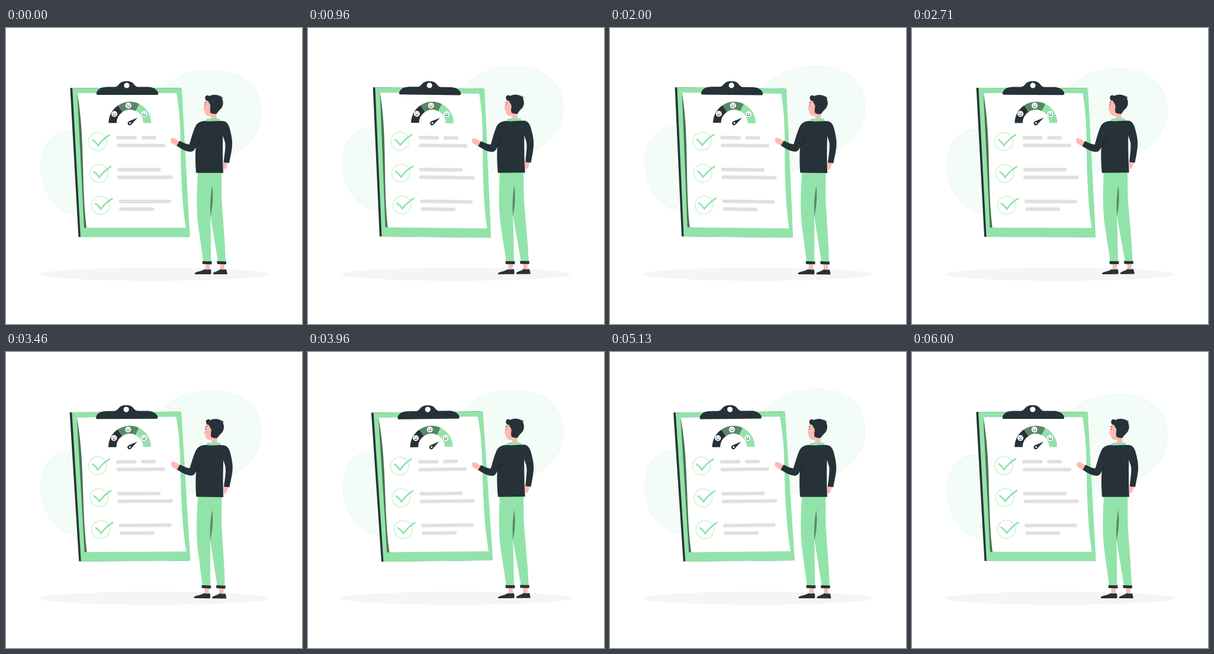
An HTML page that plays this animation: 500 by 500 pixels, repeating every 6.04 s.

```html
<!DOCTYPE html>
<html lang="en">
<head>
<meta charset="utf-8">
<title>Checklist</title>
<style>
  html, body { margin: 0; width: 100%; height: 100%; overflow: hidden; background: #fff; }
  svg { display: block; width: 100%; height: 100%; }
  .green { fill: #92e3a9; }
  .dark { fill: #263238; }
  .shade { fill: #588865; }
  .skin { fill: #ffb9b3; }
  .line { fill: none; stroke: #263238; stroke-linecap: round; }
  .bars { fill: none; stroke: #e0e0e0; stroke-width: 6; stroke-linecap: round; }
</style>
</head>
<body>
<svg viewBox="0 0 500 500">
  <defs>
    <path id="cloud" d="M59 236C58 200 78 174 110 174.5C170 175 215 155 262 106C282 84 312 71.5 348 71.5C398 71.5 431 98 431 141C431 190 395 211 355 226C310 241 260 290 215 310C185 324 140 326 108 314C75 301 60 270 59 236Z"/>
    <g id="tick" fill="none">
      <circle cx="155" cy="192" r="15.2" stroke="#def7e5" stroke-width="2.6"/>
      <path d="M146.5 189Q152 192.500 155.500 198.500Q164 187 175 180.500" stroke="#92e3a9" stroke-width="2.7" stroke-linecap="round"/>
    </g>
    <g id="face">
      <circle r="5" fill="#fff"/>
      <circle class="dark" cx="-2" cy="-1" r=".8"/>
      <circle class="dark" cx="2" cy="-1" r=".8"/>
    </g>
  </defs>

  <g id="blob">
    <use href="#cloud" class="green"/>
    <use href="#cloud" fill="#fff" opacity=".9"/>
  </g>
  <ellipse cx="250" cy="416" rx="194" ry="11" fill="#f5f5f5"/>

  <g id="board">
    <path class="dark" d="M108.300 101.300H293L307 353H122.500Z"/>
    <path class="green" d="M112 101.300H296.800L310.800 353.300H126Z"/>
    <path fill="#497255" d="M120.300 110H140V337.500H132Z"/>
    <path fill="#fff" d="M120.300 110H288C297 160 294 205 296.200 250C297.500 285 300 315 304 337.500H136C130 290 131 235 128 180C126.500 150 123 125 120.300 110Z"/>
    <path class="dark" d="M154.500 113C150.500 112 153.500 105 159 102C164 99.200 172 99.600 183 99.600C192 99.600 189 89.800 203.800 89.800C218 89.800 215 99.600 224 99.600H241C250 100 257.500 106 257 111Q257 113 254 113Z"/>
    <circle cx="203.800" cy="97" r="4.600" fill="#fff"/>

    <path class="dark" d="M173.300 160.500A36 36 0 0 1 189.200 130.700L196.700 141.900A22.500 22.500 0 0 0 186.800 160.500Z"/>
    <path class="shade" d="M189.200 130.700A36 36 0 0 1 225.100 128.200L219.200 140.300A22.500 22.500 0 0 0 196.700 141.900Z"/>
    <path class="green" d="M225.100 128.200A36 36 0 0 1 245.300 160.500H231.800A22.500 22.500 0 0 0 219.200 140.300Z"/>
    <g transform="translate(183 145.200)"><use href="#face"/><path class="line" d="M-2 2.800Q0 .6 2 2.800"/></g>
    <g transform="translate(206.800 131)"><use href="#face"/><path class="line" d="M-2 1.800H2"/></g>
    <g transform="translate(233.300 145.300)"><use href="#face"/><path class="line" d="M-2.300 1.300Q0 3.500 2.300 1.300"/></g>
    <path class="dark" d="M222.300 151.500L212.300 162.300A3.600 3.600 0 1 1 207.800 157.400Z"/>
    <circle cx="209.500" cy="160.500" r="1.500" fill="#fff"/>

    <use href="#tick"/>
    <use href="#tick" x="2" y="53.800"/>
    <use href="#tick" x="4.700" y="107.500"/>
    <path class="bars" d="M189.200 185.300H218M231.200 185.300H250.600M190 198.400H266M191 239.200H258.400M191.300 252.200H279M193.300 293H276M194.300 306H247.500"/>
  </g>

  <g id="man">
    <path class="skin" d="M337 399H344.500L344 409H337ZM361.500 399H369L369.500 409H362.500Z"/>
    <path class="dark" d="M319 415C319 411.500 329 412 335.500 407.500Q340 409 346 407.500Q347.500 412 346.500 416H320ZM350 415C350 411.800 357 412 362.500 407.500Q367 409 372 407.500Q374 412 374 416H351Z"/>
    <path class="green" d="M324 243C322.500 275 321 303 325 335L333.500 395H346.500C346.300 360 346 335 345.500 317C350 345 355 375 358.500 395H371.300C370 355 366 320 364.300 285V243Z"/>
    <path class="shade" d="M348.300 266.500C345 285 344.800 303 345.500 318C349.500 300 350.500 283 348.300 266.500Z"/>
    <path class="dark" d="M332 393.800L348 394.300L347.600 399.200L332.300 398.800ZM356.500 393.800L372.400 394.300L372 399.200L357 398.800Z"/>

    <path class="skin" d="M278.200 188C278.500 185 283 185.500 286.500 187.500L294 192.500L290 200.500C284 196.500 279 195 278.200 192ZM367 226L374.500 227.500C374 233 372 238 369 239C366 239 366.500 232 367 226Z"/>
    <path class="skin" d="M337 122C335 127 334.800 132 333 137.200L335 139C335.500 146 339 149.500 346 148.500L345.500 155H355.500L354.500 138L350 120Z"/>
    <path class="green" d="M337 157.500C337 154.500 338 153.500 341 153.200C348 152.400 355 152.200 360 153.200Q362 154.500 361.500 158Z"/>
    <path class="dark" d="M336 157C346 158.500 356 156.500 366 157C372 157.500 375.500 162 377.500 169C380 178 382 187 382 195C382 205 379 217 377 228L367.600 227C369 214 371.500 200 369.500 192L366.200 182C365.800 205 366 225 367 244.700H321C319.800 228 319.500 212 320.500 201C319 205 316.500 209 312 209C304 209 296 204 288.200 199L293 190.500C299 193.500 305 196.500 309.500 196.500C313 186 315 177 318.500 169C322 160 328 157.500 336 157Z"/>
    <path d="M321 200.500Q324 192 330 184.500" fill="none" stroke="#11191d" stroke-width=".9"/>

    <path class="dark" d="M336.200 119C335 114.500 340 112 343.200 115C349 112 357 112 361.500 115.500L362.500 113.800L363.200 116.500L366.800 117.200L364.500 118.500C367 124 367.500 130 363.500 135.500C360 139 357.500 141.500 355.500 145Q350 146 345.500 143.500C343.500 140 345.500 135 344.700 131C344.400 127 341.500 126 341 122.800C337.500 123.500 336.500 121 336.200 119Z"/>
    <ellipse class="skin" cx="342.300" cy="132.300" rx="2.800" ry="4"/>
    <path class="line" d="M335.300 126.300L337.500 126" stroke-width=".9"/>
    <circle class="dark" cx="335.800" cy="130.300" r=".8"/>
  </g>
</svg>
<script>
  const [blob, board, man] = ['blob', 'board', 'man'].map(id => document.getElementById(id));
  const FPS = 24, LOOP = 6040;

  // Triangle waves: bob runs 0, 1, 0; sway runs 0, 1, 0, -1, 0.
  const bob = p => 1 - Math.abs(1 - 2 * (p % 1));
  const sway = p => 2 * bob(p + .25) - 1;

  function draw(now) {
    const t = (Math.floor((now % LOOP) * FPS / 1000 + .13) + 1) / FPS;
    blob.setAttribute('transform', `translate(0 ${-10 * bob(t / 1.5)})`);
    board.setAttribute('transform', `rotate(${sway(t / 6)} 209.7 221.5)`);
    man.setAttribute('transform', `rotate(${sway(t / 1.5)} 330 264.5)`);
  }

  let start;
  function tick(now) {
    start ??= now;
    draw(now - start);
    requestAnimationFrame(tick);
  }
  draw(0);
  requestAnimationFrame(tick);
</script>
</body>
</html>
```
